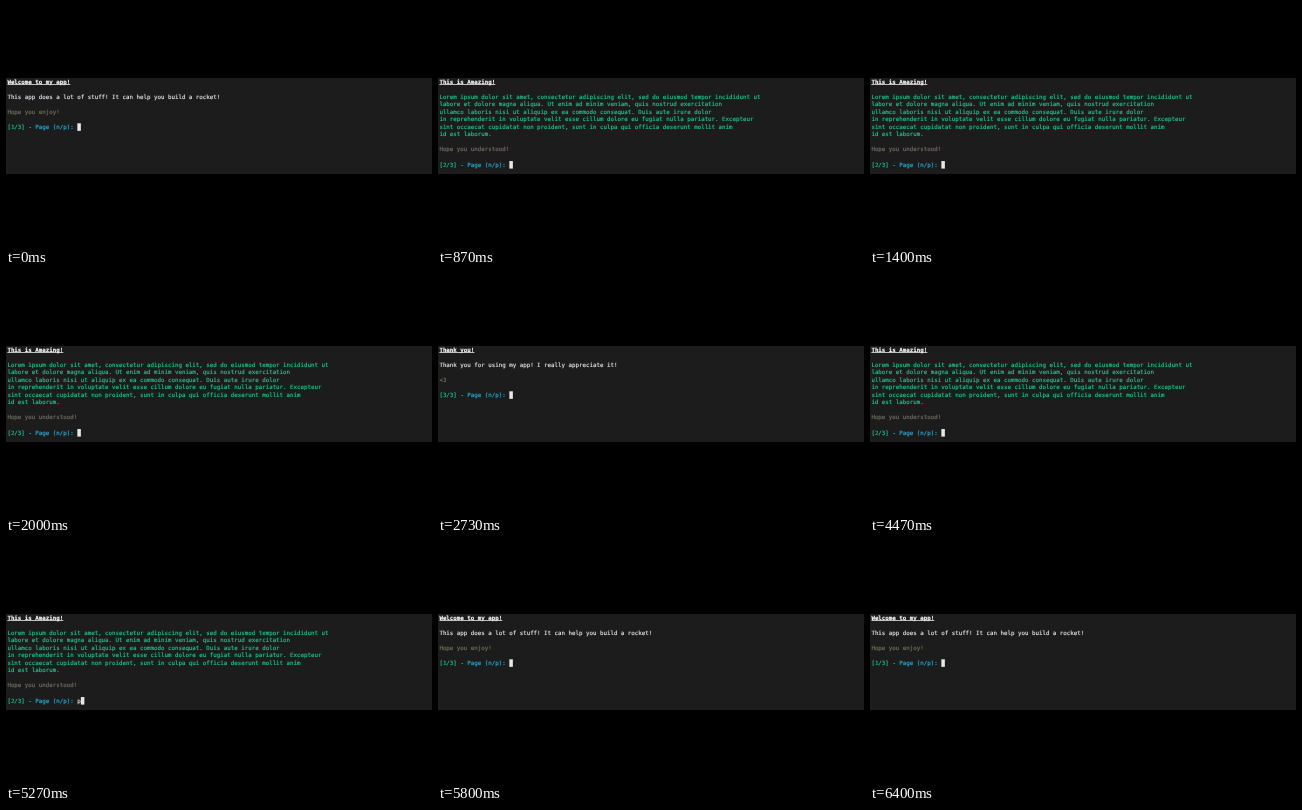
These frames come from a looping animation (426 by 240 pixels, 6470 ms). An HTML page:

```html
<!DOCTYPE html>
<html lang="en">
<head>
<meta charset="utf-8">
<title>Paged terminal app</title>
<style>
html, body { margin: 0; height: 100%; overflow: hidden; background: #000; }
svg { display: block; width: 100vw; height: 100vh; }
#screen { fill: currentColor; }
#screen * { fill: currentColor; }
text {
  font: 5.81px "DejaVu Sans Mono", "Liberation Mono", monospace;
  white-space: pre;
  text-rendering: geometricPrecision;
  stroke: currentColor;
  stroke-width: .15px;
}
.title { font-weight: bold; color: #fff; }
.plain { color: #e8e8e8; }
.green { color: #1cc992; }
.cyan { color: #22b4dc; }
.dim { color: #75705f; }
</style>
</head>
<body>
<svg viewBox="0 0 426 240">
  <rect y="72" width="426" height="96" fill="#1c1c1c"/>
  <g id="screen"></g>
</svg>
<script>
const LOOP = 6470, LEFT = 1.4, TOP = 72, CHAR = 3.498, ROW = 7.55;

const pages = [
  { title: "Welcome to my app!", style: "plain", end: "Hope you enjoy!",
    body: ["This app does a lot of stuff! It can help you build a rocket!"] },
  { title: "This is Amazing!", style: "green", end: "Hope you understood!",
    body: [
      "Lorem ipsum dolor sit amet, consectetur adipiscing elit, sed do eiusmod tempor incididunt ut",
      "labore et dolore magna aliqua. Ut enim ad minim veniam, quis nostrud exercitation",
      "ullamco laboris nisi ut aliquip ex ea commodo consequat. Duis aute irure dolor",
      "in reprehenderit in voluptate velit esse cillum dolore eu fugiat nulla pariatur. Excepteur",
      "sint occaecat cupidatat non proident, sunt in culpa qui officia deserunt mollit anim",
      "id est laborum."
    ] },
  { title: "Thank you!", style: "plain", end: "&lt;3",
    body: ["Thank you for using my app! I really appreciate it!"] }
];

// [start in ms, page index, typed key]
const steps = [
  [0, 0, ""], [530, 0, "n"],
  [800, 1, ""], [2200, 1, "n"],
  [2470, 2, ""], [3870, 2, "p"],
  [4130, 1, ""], [5200, 1, "p"],
  [5470, 0, ""]
];

const screen = document.getElementById("screen");

function line(row, style, str, col = 0) {
  const x = LEFT + col * CHAR, y = TOP + row * ROW + 5.5;
  return `<text class="${style}" x="${x}" y="${y}">${str}</text>`;
}

function block(x, y, width, height) {
  return `<rect class="plain" x="${x}" y="${y}" width="${width}" height="${height}"/>`;
}

function render([, index, key]) {
  const { title, style, body, end } = pages[index];
  const endRow = body.length + 3, promptRow = endRow + 2;
  const cursorX = LEFT + (20 + key.length) * CHAR;
  screen.innerHTML =
    line(0, "title", title) + block(LEFT, TOP + 6, title.length * CHAR, .8) +
    body.map((str, i) => line(i + 2, style, str)).join("") +
    line(endRow, "dim", end) +
    line(promptRow, "green", `[${index + 1}/3]`) +
    line(promptRow, "cyan", "- Page (n/p):", 6) +
    line(promptRow, "plain", key, 20) +
    block(cursorX, TOP + promptRow * ROW, CHAR, ROW);
}

let shown;
function tick() {
  const time = performance.now() % LOOP;
  const step = steps.findLast(([start]) => start <= time);
  if (step !== shown) render(shown = step);
  requestAnimationFrame(tick);
}
tick();
</script>
</body>
</html>
```
